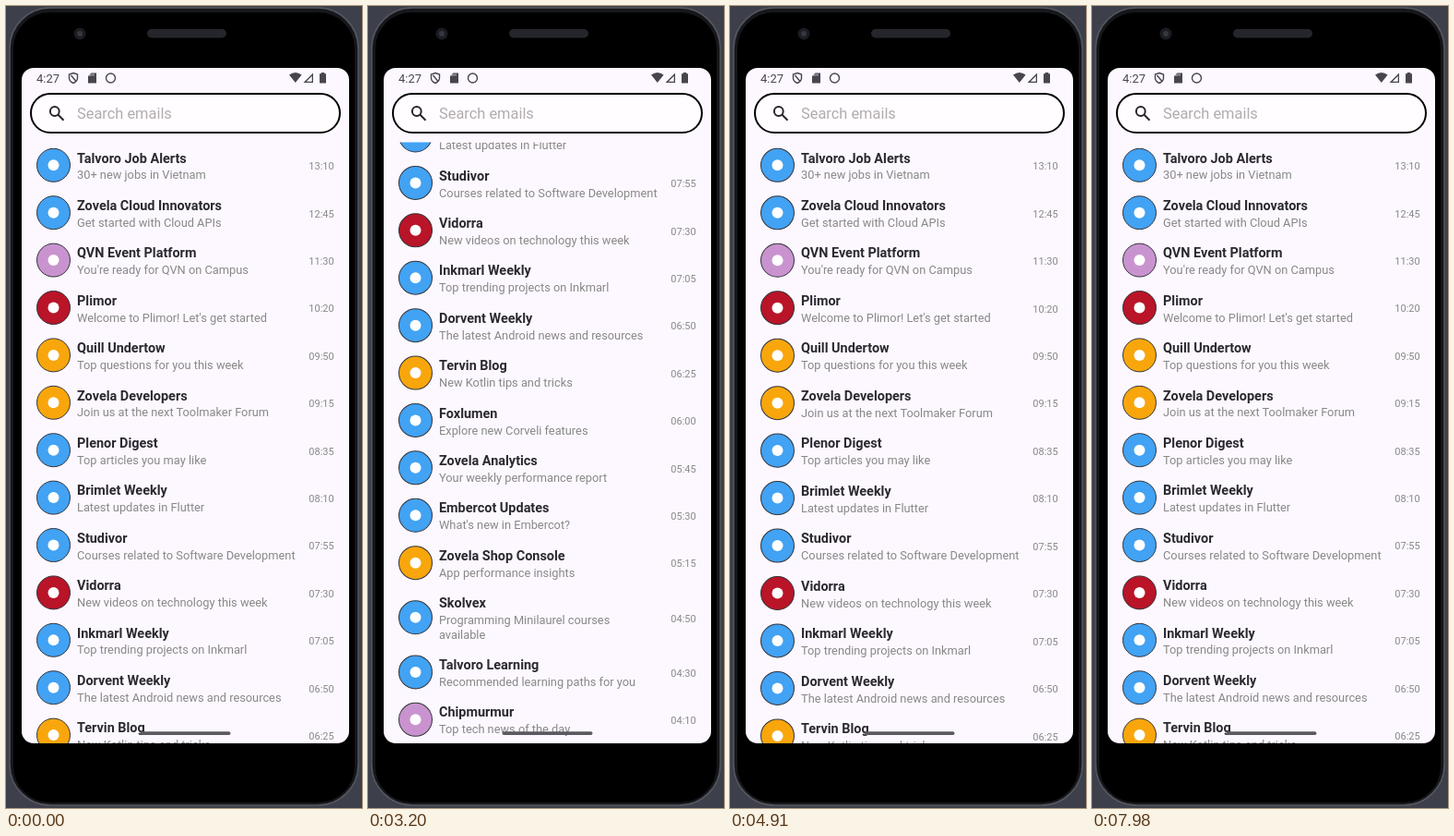
An HTML page that plays this animation: 386 px wide and 868 px high, repeating every 8 s.

```html
<!DOCTYPE html>
<html lang="en">
<head>
<meta charset="utf-8">
<title>Mail list</title>
<style>
  html, body { margin: 0; width: 100%; height: 100%; overflow: hidden; background: #000; }
  svg { display: block; width: 386px; height: 868px; font-family: Roboto, sans-serif; }
  .title { font-size: 14.45px; font-weight: 700; fill: #2b2930; }
  .sub { font-size: 12.82px; fill: #888; }
  .time { font-size: 11px; fill: #888; text-anchor: end; }
  .avatar { stroke: #33343c; stroke-width: 1; }
  .hint { font-size: 16.4px; fill: #b3abae; }
  .clock { font-size: 13px; fill: #49454f; }
</style>
</head>
<body>
<svg viewBox="0 0 386 868">
  <defs>
    <clipPath id="view"><rect x="17" y="147.4" width="355" height="650.6"/></clipPath>
  </defs>

  <!-- phone body -->
  <rect width="386" height="868" fill="#3d3f4b"/>
  <rect x="4" y="2" width="378" height="863" rx="44" fill="#16171b" stroke="#55575f" stroke-width="1.5"/>
  <rect x="8" y="7" width="370" height="855" rx="39" fill="#000"/>
  <circle cx="80" cy="30" r="6.5" fill="#1b1c21"/>
  <circle cx="80" cy="30" r="3" fill="#34363f"/>
  <rect x="153" y="25" width="86" height="9.5" rx="4.7" fill="#25262c"/>

  <!-- screen -->
  <rect x="17" y="67" width="355" height="731" rx="13" fill="#fdf8ff"/>
  <text class="clock" x="33" y="82.6">4:27</text>
  <g fill="none" stroke="#49454f" stroke-width="1.4">
    <path d="M73 72.5 L77.5 74 V78 Q77.5 81.5 73 83.5 Q68.5 81.5 68.5 78 V74 Z M70.5 75 L75.5 81"/>
    <circle cx="113.5" cy="78" r="5"/>
  </g>
  <g fill="#49454f">
    <path d="M92.5 72.5 H98 V83.5 H89 V76 Z"/>
    <path d="M307 74.5 Q313.8 69.5 320.6 74.5 L313.8 83 Z"/>
    <path d="M333 72.5 V83 H322.5 Z M331.7 75.7 L325.8 81.7 H331.7 Z" fill-rule="evenodd"/>
    <path d="M341.7 72 H345.3 V73.3 H347 V83.5 H340 V73.3 H341.7 Z"/>
  </g>
  <path d="M91 74 v2 M93 73.5 v2 M95 73.5 v2" stroke="#fdf8ff" stroke-width=".8"/>

  <rect x="27" y="95" width="335" height="42" rx="21" fill="#fffdff" stroke="#000" stroke-width="2"/>
  <g fill="none" stroke="#28262c" stroke-width="2">
    <circle cx="52.8" cy="114" r="4.9"/>
    <path d="M56.3 117.5 L62.5 123.7"/>
  </g>
  <text class="hint" x="77" y="122">Search emails</text>

  <g clip-path="url(#view)"><g id="list"></g></g>
  <rect x="145.5" y="785.2" width="98" height="3.8" rx="1.9" fill="#5c5960"/>
</svg>

<script>
const LOOP = 8000, TOP = 146.6, BOTTOM = 798, ROW = 51.4, LINE = 15.4;
const COLORS = { b: '#42a2f3', p: '#c993cf', r: '#b91427', a: '#f8a60c' };

// color | title | text (a slash breaks the line) | time
const MAILS = `b|Talvoro Job Alerts|30+ new jobs in Vietnam|13:10
b|Zovela Cloud Innovators|Get started with Cloud APIs|12:45
p|QVN Event Platform|You're ready for QVN on Campus|11:30
r|Plimor|Welcome to Plimor! Let's get started|10:20
a|Quill Undertow|Top questions for you this week|09:50
a|Zovela Developers|Join us at the next Toolmaker Forum|09:15
b|Plenor Digest|Top articles you may like|08:35
b|Brimlet Weekly|Latest updates in Flutter|08:10
b|Studivor|Courses related to Software Development|07:55
r|Vidorra|New videos on technology this week|07:30
b|Inkmarl Weekly|Top trending projects on Inkmarl|07:05
b|Dorvent Weekly|The latest Android news and resources|06:50
a|Tervin Blog|New Kotlin tips and tricks|06:25
b|Foxlumen|Explore new Corveli features|06:00
b|Zovela Analytics|Your weekly performance report|05:45
b|Embercot Updates|What's new in Embercot?|05:30
a|Zovela Shop Console|App performance insights|05:15
b|Skolvex|Programming Minilaurel courses/available|04:50
b|Talvoro Learning|Recommended learning paths for you|04:30
p|Chipmurmur|Top tech news of the day|04:10`.split('\n').map(row => row.split('|'));

const list = document.getElementById('list');

function add(tag, attrs, text = '') {
  const el = document.createElementNS('http://www.w3.org/2000/svg', tag);
  for (const key in attrs) el.setAttribute(key, attrs[key]);
  el.textContent = text;
  list.append(el);
}

let end = TOP;
for (const [color, title, text, time] of MAILS) {
  const lines = text.split('/');
  const height = ROW + (lines.length - 1) * LINE;
  const mid = end + height / 2;
  add('circle', { class: 'avatar', cx: 51.5, cy: mid, r: 18, fill: COLORS[color] });
  add('circle', { cx: 51.5, cy: mid, r: 6, fill: '#fff' });
  add('text', { class: 'title', x: 77, y: end + 22.9 }, title);
  for (const [i, line] of lines.entries()) {
    add('text', { class: 'sub', x: 77, y: end + 40.8 + i * LINE }, line);
  }
  add('text', { class: 'time', x: 355.7, y: mid + 4.8 }, time);
  end += height;
}
const maxScroll = end - BOTTOM;

const progress = (t, from, to) => Math.min(1, Math.max(0, (t - from) / (to - from)));
const easeOut = u => u * (2 - u);
const easeInOut = u => u * u * (3 - 2 * u);

// Two flicks down the list, one back up.
function scrollAt(t) {
  const first = 240;
  return first * easeOut(progress(t, 1790, 2560))
    + (maxScroll - first) * easeOut(progress(t, 2700, 3030))
    - maxScroll * easeInOut(progress(t, 4080, 4640));
}

// Overscroll: grows while the finger pulls, then a critically damped spring lets go.
function pull(t, start, release, peak) {
  const x = Math.max(0, t - release) * 0.0247;
  return peak * easeOut(progress(t, start, release)) * (1 + x) * Math.exp(-x);
}

function draw(now) {
  const t = now % LOOP;
  const atBottom = pull(t, 3200, 3928, 0.045);
  const atTop = pull(t, 4620, 4710, 0.03) + pull(t, 5010, 6145, 0.04);
  const anchor = atBottom > atTop ? BOTTOM : TOP;
  const scale = 1 + Math.max(atBottom, atTop);
  list.setAttribute('transform',
    `translate(0 ${anchor}) scale(1 ${scale}) translate(0 ${-anchor - scrollAt(t)})`);
  requestAnimationFrame(() => draw(performance.now()));
}
draw(performance.now());
</script>
</body>
</html>
```
